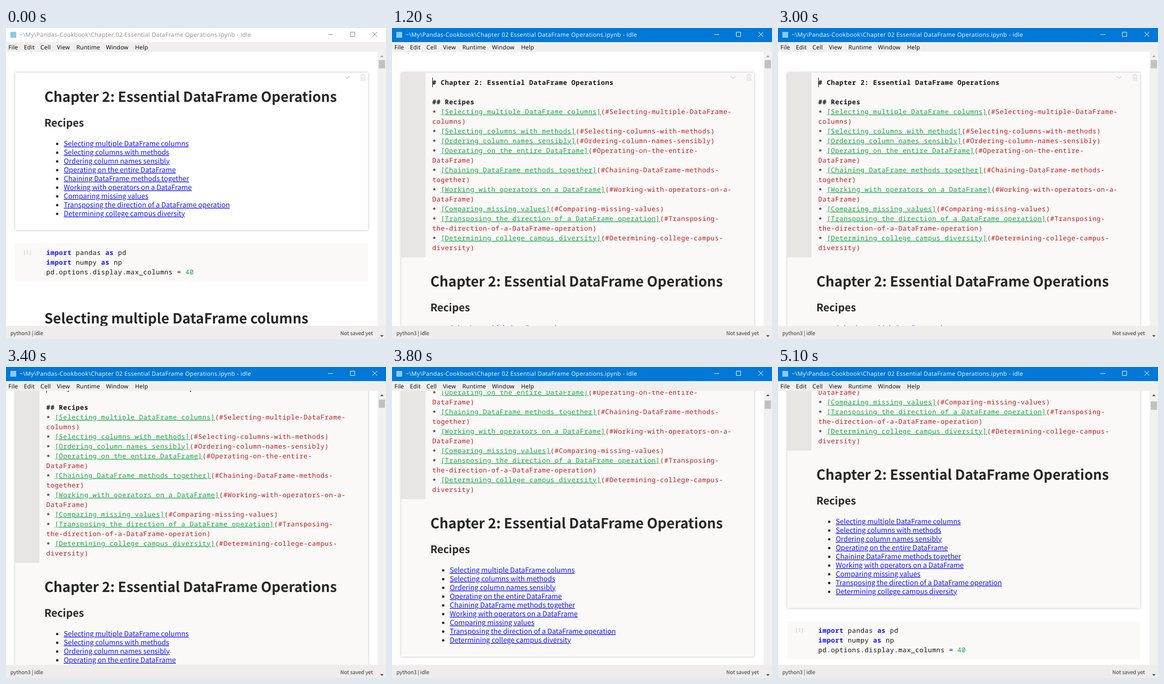
Animation of 783 by 640 pixels, one loop 8 s. Source, as an HTML page:

```html
<!DOCTYPE html>
<html lang="en">
<head>
<meta charset="utf-8">
<title>Notebook</title>
<style>
html, body { margin: 0; width: 100%; height: 100%; overflow: hidden; background: #fff; }
svg { display: block; width: 783px; height: 640px; }
text { white-space: pre; text-rendering: geometricPrecision;
  font-family: "Noto Sans CJK SC", "Noto Sans CJK JP", "Noto Sans", sans-serif; fill: #262626; }
.h1 { font-size: 28.65px; font-weight: 700; }
.h2 { font-size: 21.45px; font-weight: 700; }
.link, .ref { text-decoration: underline 1px; text-underline-offset: 1px; }
.link { font-size: 14.32px; fill: #1414ff; }
.ui { font: 12px "Open Sans", "Noto Sans", sans-serif; letter-spacing: .2px; fill: #000; }
#title { letter-spacing: .4px; }
.status { font-size: 10.7px; fill: #333; }
.code { font: 13.5px "Noto Sans Mono", "DejaVu Sans Mono", monospace; letter-spacing: .59px; fill: #111; }
.prompt { font-size: 10px; letter-spacing: 0; fill: #c4c4c4; }
.bold { font-weight: 700; }
.key { font-weight: 700; fill: #1414ff; }
.num { fill: #0eaa3c; }
.ref { fill: #17a644; }
.url { fill: #c41a1a; }
#cell { filter: drop-shadow(0 0 2.5px #0004); }
.icon { fill: none; stroke: #dcdcdc; }
</style>
</head>
<body>
<svg viewBox="0 0 783 640">
  <clipPath id="view"><rect y="49" width="766" height="564"/></clipPath>
  <g clip-path="url(#view)">
    <g id="page">
      <rect id="cell" x="19" y="92" width="727"/>
      <g id="editor">
        <rect x="19" y="92" width="727" height="380" fill="#faf9f8"/>
        <rect x="19" y="92" width="50" height="380" fill="#e7e6e3"/>
        <g id="source"></g>
        <rect id="caret" x="83" y="102" width="1" height="20"/>
      </g>
      <g class="icon">
        <path d="M698.5 99.5l4.5 4.5 4.5-4.5" stroke-width="2"/>
        <path d="M730 97.500h11M733.500 97v-1.500h4v1.500M731.500 98v10.500h8V98M733.500 100v7M735.500 100v7M737.500 100v7"/>
      </g>
      <g id="rest">
        <text class="h1" x="79" y="152">Chapter 2: Essential DataFrame Operations</text>
        <text class="h2" x="79" y="203">Recipes</text>
        <g id="links"></g>
        <rect x="19" y="443" width="727" height="79" fill="#faf9f8"/>
        <text class="code prompt" x="35" y="465">[1]</text>
        <text class="code" x="83" y="467"><tspan class="key">import</tspan> pandas <tspan class="key">as</tspan> pd</text>
        <text class="code" x="83" y="487"><tspan class="key">import</tspan> numpy <tspan class="key">as</tspan> np</text>
        <text class="code" x="83" y="507">pd.options.display.max_columns = <tspan class="num">40</tspan></text>
        <text class="h1" x="79" y="608">Selecting multiple DataFrame columns</text>
      </g>
    </g>
  </g>

  <rect id="bar" width="783" height="29"/>
  <rect x="9" y="8" width="12" height="12" fill="#8cc8e8"/>
  <text id="title" class="ui" x="28" y="18">~\My\Pandas-Cookbook\Chapter 02 Essential DataFrame Operations.ipynb - idle</text>
  <path id="buttons" fill="none" d="M664 13.500h10M709.500 8.500h9v9h-9zM755 8l10 10M765 8l-10 10"/>

  <rect y="29" width="783" height="20" fill="#f0efee"/>
  <g id="menu"></g>

  <rect y="613" width="783" height="27" fill="#eeedec"/>
  <text class="status" x="9" y="632">python3 | idle</text>
  <text class="status" x="756" y="632" text-anchor="end">Not saved yet</text>

  <rect x="766" y="49" width="17" height="564" fill="#f1f1f1"/>
  <path id="up" d="M771 60h7l-3.500-4z"/>
  <path d="M771 632h7l-3.500 4z" fill="#505050"/>
  <rect id="thumb" x="768" width="13" height="17" fill="#c1c1c1"/>
</svg>
<script>
const $ = id => document.getElementById(id);
const LOOP = 8000, EDITOR_H = 380, MAX_COLS = 71;
const recipes = [
  'Selecting multiple DataFrame columns',
  'Selecting columns with methods',
  'Ordering column names sensibly',
  'Operating on the entire DataFrame',
  'Chaining DataFrame methods together',
  'Working with operators on a DataFrame',
  'Comparing missing values',
  'Transposing the direction of a DataFrame operation',
  'Determining college campus diversity'
];

const span = (cls, s) => `<tspan class="${cls}">${s}</tspan>`;
const text = (cls, x, y, s) => `<text class="${cls}" x="${x}" y="${y}">${s}</text>`;

$('menu').innerHTML = [['File', 5], ['Edit', 37], ['Cell', 71], ['View', 105],
  ['Runtime', 145], ['Window', 206], ['Help', 266]]
  .map(([name, x]) => text('ui', x, 44, name)).join('');

$('links').innerHTML = recipes.map((name, i) =>
  `<circle cx="105.500" cy="${238.5 + 18 * i}" r="2.5" fill="#262626"/>` +
  text('link', 119, 243 + 18 * i, name)).join('');

// Markdown source, wrapped after hyphens
const lines = [span('bold', '# Chapter 2: Essential DataFrame Operations'), '', span('bold', '## Recipes')];
for (const name of recipes) {
  let head = `<tspan dy="2">*</tspan><tspan dy="-2"> </tspan>` + span('ref', `[${name}]`);
  let cols = name.length + 4, part = '';
  for (const word of `(#${name.replace(/ /g, '-')})`.split(/(?<=-)/)) {
    if (cols + word.length > MAX_COLS) {
      lines.push(head + span('url', part));
      head = part = '';
      cols = 0;
    }
    part += word;
    cols += word.length;
  }
  lines.push(head + span('url', part));
}
$('source').innerHTML = lines.map((s, i) => text('code', 83, 117 + 20 * i, s)).join('');

// Each wheel notch eases the page by 100 px, refreshed every 100 ms
const notches = [3211, 3487, 4811];
function scrollAt(t) {
  const now = Math.floor(t / 100) * 100;
  return Math.round(notches.reduce((sum, start) => {
    const u = Math.min(1, Math.max(0, (now - start) / 300));
    return sum + 100 * u * u * (3 - 2 * u);
  }, 0));
}

const set = (id, attrs) => {
  for (const k in attrs) $(id).setAttribute(k, attrs[k]);
};

function draw(now) {
  const t = now % LOOP, active = t >= 500, editing = t >= 1200, y = scrollAt(t);
  const caretOff = (t >= 1800 && t < 2000) || (t >= 2500 && t < 3000);
  set('bar', { fill: active ? '#0078d7' : '#fff' });
  $('title').style.fill = active ? '#fff' : '#8c8c8c';
  set('buttons', { stroke: active ? '#fff' : '#808080' });
  set('editor', { display: editing ? 'inline' : 'none' });
  set('caret', { display: caretOff ? 'none' : 'inline' });
  set('cell', { height: 324 + (editing ? EDITOR_H : 0), fill: editing ? '#faf9f8' : '#fff' });
  set('rest', { transform: `translate(0 ${editing ? EDITOR_H : 0})` });
  set('page', { transform: `translate(0 ${-y})` });
  set('thumb', { y: 66 + Math.round(y * 0.017) });
  set('up', { fill: y ? '#505050' : '#a3a3a3' });
  requestAnimationFrame(draw);
}
draw(performance.now());
</script>
</body>
</html>
```
